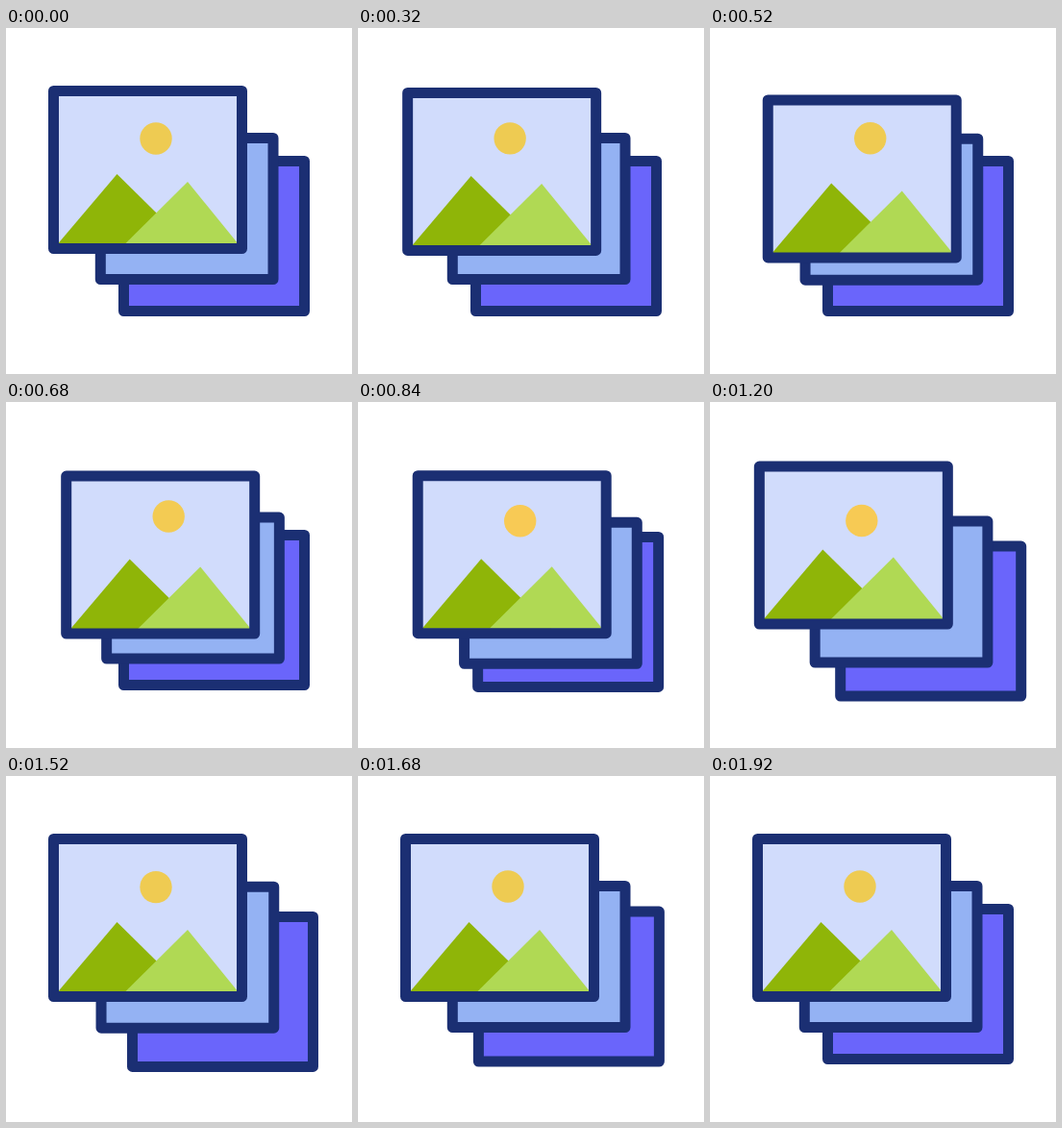
Write an HTML page that moves like this. It is 360 by 360 pixels and loops after 2120 ms.

```html
<!DOCTYPE html>
<html lang="en">
<head>
<meta charset="utf-8">
<title>Stacked pictures</title>
<style>
  html, body { margin: 0; width: 100%; height: 100%; overflow: hidden; background: #fff; }
  svg { display: block; width: 100%; height: 100%; }
  .frame { stroke: #1b2f73; stroke-width: 11; stroke-linejoin: round; }
</style>
</head>
<body>
<svg viewBox="0 0 360 360">
  <g id="back">
    <rect class="frame" x="122.5" y="138.5" width="188" height="156" fill="#6a65fb"/>
  </g>
  <g id="middle">
    <rect class="frame" x="98.3" y="114.5" width="179.7" height="147" fill="#94b2f3"/>
  </g>
  <g id="front">
    <rect x="49.5" y="65.5" width="196" height="164" fill="#d1dcfc"/>
    <circle id="sun" cx="156" cy="115" r="16.7"/>
    <path d="M54 224.5 L115.5 152 L189 224.5Z" fill="#8fb508"/>
    <path d="M124 224.5 L189 160 L241.5 224.5Z" fill="#b0d954"/>
    <rect class="frame" x="49.5" y="65.5" width="196" height="164" fill="none"/>
  </g>
</svg>
<script>
  const LOOP = 2120, STEP = 40;
  const SHIFT = { x: 13.2, y: 11.6 };
  const DELAY = { front: 0, middle: 260, back: 520 };
  const el = id => document.getElementById(id);
  const sun = el('sun');

  // Cubic bezier (.5, 0, .5, 1), solved by bisection.
  function ease(x) {
    if (x <= 0) return 0;
    if (x >= 1) return 1;
    let lo = 0, hi = 1;
    for (let i = 0; i < 20; i++) {
      const s = (lo + hi) / 2;
      if (1.5 * s * (1 - s) + s ** 3 < x) lo = s; else hi = s;
    }
    return lo * lo * (3 - 2 * lo);
  }

  // 0 at rest, 1 when pushed out.
  const push = t => ease((t - 160) / 530) - ease((t - 740) / 640);

  const mix = (a, b, k) => a.map((v, i) => Math.round(v + (b[i] - v) * k));

  function draw(t) {
    const amount = {};
    for (const id in DELAY) {
      const p = amount[id] = push(t - DELAY[id]);
      el(id).setAttribute('transform', `translate(${SHIFT.x * p} ${SHIFT.y * p})`);
    }
    // The sun follows its card sideways but drops later, with the middle card.
    const { front, middle } = amount;
    sun.setAttribute('cy', 115 + 10.5 * middle - front - SHIFT.y * front);
    sun.setAttribute('fill', `rgb(${mix([238, 203, 82], [249, 202, 85], middle)})`);
  }

  const start = performance.now();
  function tick() {
    const t = (performance.now() - start) % LOOP;
    draw(Math.floor(t / STEP) * STEP);
    requestAnimationFrame(tick);
  }
  tick();
</script>
</body>
</html>
```
